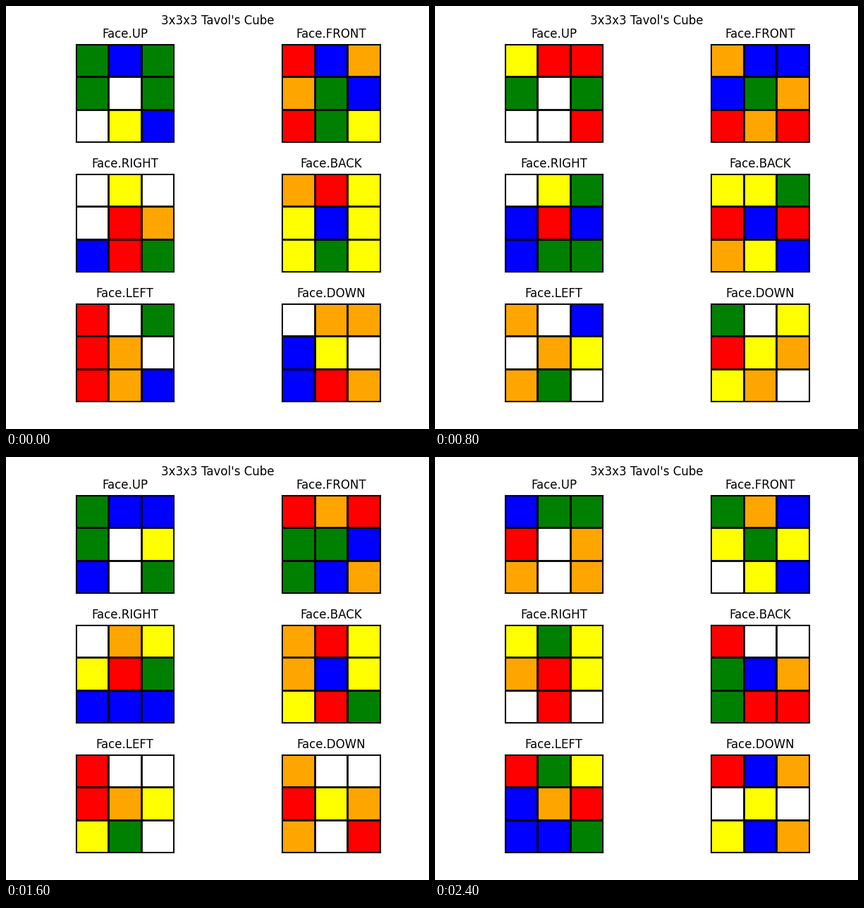
Write a matplotlib script that moves like this. It is 600 px wide and 600 px high and loops after 2.6 s.

```python
import itertools

import matplotlib.pyplot as plt
import numpy as np
from matplotlib.animation import FuncAnimation
from matplotlib.colors import to_rgb

SIZE, DPI = 600, 100
SIDE = 139.4
COLORS = dict(W="white", Y="yellow", R="red", O="orange", B="blue", G="green")

# name: (outward normal, direction of a row from left to right, stickers)
FACES = {
    "UP": ((0, 1, 0), (1, 0, 0), "GBG GWG WYB"),
    "FRONT": ((0, 0, 1), (1, 0, 0), "RBO OGB RGY"),
    "RIGHT": ((1, 0, 0), (0, 0, -1), "WYW WRO BRG"),
    "BACK": ((0, 0, -1), (-1, 0, 0), "ORY YBY YGY"),
    "LEFT": ((-1, 0, 0), (0, 0, 1), "RWG ROW ROB"),
    "DOWN": ((0, -1, 0), (1, 0, 0), "WOO BYW BRO"),
}
MOVES = "D2 D' F' B' B R2 R F2 L2 R' D' B2".split()
QUARTERS = {"": 1, "2": 2, "'": 3}


def sticker_spots(name):
    """Positions of a face's nine stickers in reading order."""
    normal, right = np.array(FACES[name][0]), np.array(FACES[name][1])
    down = np.cross(right, normal)
    return [tuple(2 * normal + col * right + row * down)
            for row, col in itertools.product((-1, 0, 1), repeat=2)]


def quarter_turn(cube, normal):
    """Turn the layer on the normal's side clockwise, seen from outside."""
    turned = {}
    for spot, color in cube.items():
        depth = np.dot(spot, normal)
        if depth >= 1:
            spot = tuple(np.cross(spot, normal) + depth * normal)
        turned[spot] = color
    return turned


def apply_move(cube, move):
    normal = next(np.array(face[0]) for name, face in FACES.items()
                  if name[0] == move[0])
    for _ in range(QUARTERS[move[1:]]):
        cube = quarter_turn(cube, normal)
    return cube


def face_pixels(cube, name):
    colors = [to_rgb(COLORS[cube[spot]]) for spot in SPOTS[name]]
    return np.reshape(colors, (3, 3, 3))


SPOTS = {name: sticker_spots(name) for name in FACES}
start = {spot: color for name, face in FACES.items()
         for spot, color in zip(SPOTS[name], face[2].replace(" ", ""))}
states = list(itertools.accumulate(MOVES, apply_move, initial=start))

fig = plt.figure(figsize=(SIZE / DPI, SIZE / DPI), dpi=DPI, facecolor="white")
fig.suptitle("3x3x3 Tavol's Cube", fontsize=12)

images = {}
edges = np.arange(4) - 0.5
for index, name in enumerate(FACES):
    row, col = divmod(index, 2)
    left, top = 99 + 292.45 * col, 53.67 + 184 * row
    ax = fig.add_axes([left / SIZE, 1 - (top + SIDE) / SIZE,
                       SIDE / SIZE, SIDE / SIZE])
    images[name] = ax.imshow(face_pixels(start, name), aspect="auto")
    ax.set(xticks=edges, yticks=edges)
    ax.tick_params(length=0, labelbottom=False, labelleft=False)
    ax.grid(color="black", linewidth=2)
    ax.set_title(f"Face.{name}", fontsize=12)


def update(frame):
    for name, image in images.items():
        image.set_data(face_pixels(states[frame], name))
    return list(images.values())


anim = FuncAnimation(fig, update, frames=len(states), interval=200, repeat=True)
plt.show()
```
